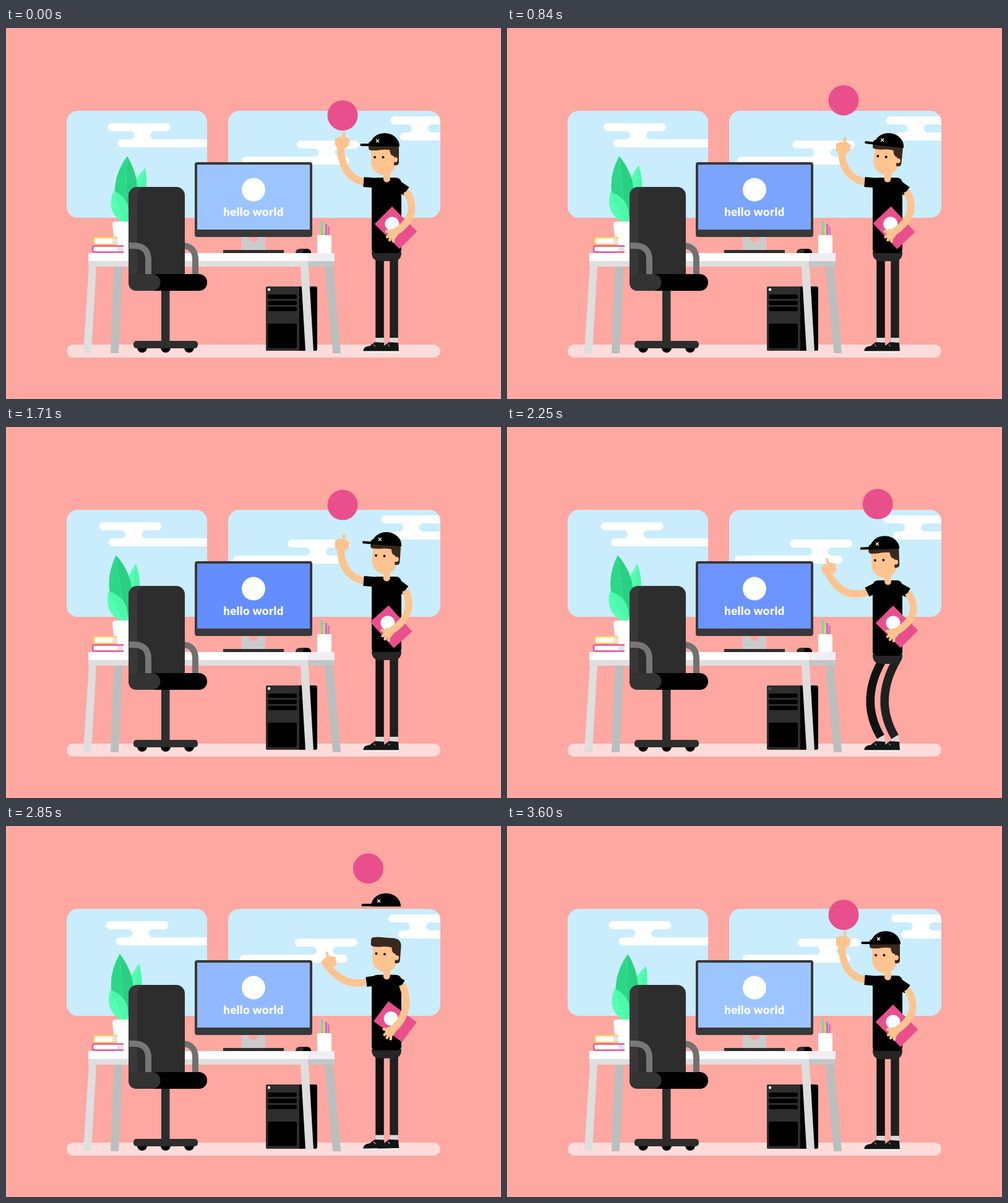
Write an HTML page that moves like this. It is 800x600 px and loops after 3.63 s.

```html
<!DOCTYPE html>
<html lang="en">
<head>
<meta charset="utf-8">
<title>Hello world</title>
<style>
html, body { margin: 0; width: 100%; height: 100%; overflow: hidden; background: #ffa7a1; }
svg { display: block; width: 800px; height: 600px; }
.skin { stroke: #ffc38f; fill: none; stroke-linecap: round; }
.sleeve { stroke: #000; stroke-width: 16; }
</style>
</head>
<body>
<svg viewBox="0 0 800 600">
  <defs>
    <clipPath id="panes">
      <rect x="98" y="134" width="227" height="173" rx="18"/>
      <rect x="359" y="134" width="343" height="173" rx="18"/>
    </clipPath>
    <g id="cloud" fill="#fff">
      <rect width="101" height="13" rx="6.5"/>
      <rect x="16" y="26" width="174" height="13" rx="6.5"/>
    </g>
    <path id="neck" d="M33 12.5V13a6.5 6.5 0 0 1 0 13v.5H72V26a6.5 6.5 0 0 1 0-13v-.5z" fill="#fff"/>
    <g id="shoe">
      <rect x="-6.500" y="-9" width="13" height="12" fill="#d9d9d9"/>
      <path d="M-27 14q0-8 11-9l8-6 15 1 1 14z" fill="#151515"/>
      <path d="M-28 14.5H8" stroke="#fff" stroke-width="2"/>
      <path d="M-10 3l3 3" stroke="#ddd"/>
    </g>
    <g id="slots"><rect x="423" width="47" height="7" rx="3"/></g>
  </defs>

  <g clip-path="url(#panes)">
    <path d="M90 130H710V310H90z" fill="#c9edfc"/>
    <g id="clouds">
      <use href="#cloud" x="164.500" y="154"/>
      <use href="#neck" x="168" y="154"/>
      <use href="#cloud" x="621" y="143"/>
      <use href="#neck" x="616.500" y="143"/>
      <g transform="translate(571 182) scale(-1 1)"><use href="#cloud"/><use href="#neck"/></g>
    </g>
  </g>
  <rect x="98" y="512" width="604" height="21" rx="10.500" fill="#ffdcda"/>

  <g id="plant"></g>
  <path d="M176 313H215V364H177L172 318q0-5 4-5z" fill="#fff"/>

  <!-- books -->
  <path d="M180 338.500H146q-4 0-4 4v4q0 4 4 4H180z" fill="#fff"/>
  <path d="M172 340h8v10h-8z" fill="#e3e3e3"/>
  <path d="M180 339H146q-4 0-4 4v3q0 4 4 4H180" fill="none" stroke="#ffcf56" stroke-width="2.500"/>
  <path d="M190 352H144q-4 0-4 4v2q0 4 4 4H190z" fill="#fff"/>
  <path d="M180 353h10v9h-10z" fill="#e3e3e3"/>
  <path d="M190 352.500H144q-4 0-4 4v2q0 4 4 4H190" fill="none" stroke="#e4569a" stroke-width="2.500"/>

  <!-- computer case -->
  <rect x="420" y="418" width="83" height="104" rx="3"/>
  <path d="M423 418H474V522H423q-3 0-3-3V421q0-3 3-3z" fill="#2e2e2e"/>
  <use href="#slots" y="431"/><use href="#slots" y="441"/><use href="#slots" y="451"/>
  <rect x="423" y="478" width="47" height="40" rx="3"/>
  <circle id="led" cx="425" cy="423" r="2.200"/>

  <!-- desk -->
  <g stroke-linejoin="round" stroke-width="2">
    <path d="M176 386h11l-6 139h-11zM516 386h11l13 139h-11z" fill="#b9bfbe" stroke="#b9bfbe"/>
    <path d="M135 386h10l-8 139h-11zM477 386h11l8 137h-11z" fill="#dedede" stroke="#dedede"/>
  </g>
  <path d="M133 364H488V377H133z" fill="#fff"/>
  <path d="M488 364H531V377H488z" fill="#f1eef3"/>
  <path d="M133 377H488V386H133z" fill="#dedede"/>
  <path d="M488 377H531V386H488z" fill="#c2c7c6"/>

  <!-- monitor -->
  <path d="M381 338H419V360H381z" fill="#cbcbcb"/>
  <path d="M392 338a8 8 0 0 0 16 0z" fill="#ffa7a1"/>
  <path d="M351 359H449V364H351z" fill="#2d2d2d"/>
  <rect x="305" y="217" width="190" height="121" rx="4" fill="#383838"/>
  <path id="screen" d="M309 221H491V326H309z"/>
  <circle cx="400" cy="261.500" r="19" fill="#fff"/>
  <text x="400" y="304" text-anchor="middle" font-family="Lato, sans-serif" font-weight="900" font-size="18.500" letter-spacing=".4" fill="#fff">hello world</text>
  <path d="M468 364q0-7 8-7h9q8 0 8 7z" fill="#2d2d2d"/>
  <path d="M480 364q0-6 4-7 9 0 9 7z"/>

  <!-- pencils -->
  <g stroke-width="3">
    <path d="M507 319V340" stroke="#f5a9c0"/>
    <path d="M510.500 312V340" stroke="#5fe0a0"/>
    <path d="M514 320V340" stroke="#ffc455"/>
    <path d="M517.500 317V340" stroke="#a274dc"/>
    <path d="M521.500 321V340" stroke="#e56fb0"/>
  </g>
  <rect x="503" y="335" width="23" height="29" rx="2" fill="#fff"/>

  <!-- chair -->
  <circle cx="220" cy="517" r="8"/><circle cx="258" cy="517" r="8"/><circle cx="296" cy="517" r="8"/>
  <path d="M251 420H264.500V510H251z" fill="#2d2d2d"/>
  <rect x="206" y="506" width="104" height="12" rx="5" fill="#2d2d2d"/>
  <path d="M284 352q22 0 22 23V400" fill="none" stroke="#707070" stroke-width="10"/>
  <rect x="198" y="257" width="60" height="168" rx="14" fill="#383838"/>
  <rect x="212" y="257" width="77" height="160" rx="14" fill="#2d2d2d"/>
  <rect x="220" y="398" width="105" height="27" rx="13" fill="#000"/>
  <path d="M198 398H236a13.500 13.500 0 0 1 0 27H212q-14 0-14-14z" fill="#333"/>
  <path d="M199 352H206q24 0 24 23V398" fill="none" stroke="#777" stroke-width="10"/>

  <!-- person -->
  <use id="shoeL" href="#shoe"/>
  <use id="shoeR" href="#shoe"/>
  <path id="legL" fill="none" stroke="#111" stroke-width="13.500"/>
  <path id="legR" fill="none" stroke="#202020" stroke-width="13.500"/>
  <path id="armL" class="skin" stroke-width="11.500"/>
  <path id="sleeveL" class="sleeve"/>
  <g id="handL" class="skin" stroke-width="4.500">
    <rect x="-9" y="-6" width="18" height="14" rx="5" fill="#ffc38f"/>
    <path d="M-9-5V0M-4-7V0M2-4 3.500-15M6 3l5-5"/>
  </g>
  <g id="torso">
    <path d="M591 362H639V363q0 14-14 14H605q-14 0-14-14z" fill="#262626"/>
    <path d="M600 242H630q9 0 9 11V358q0 6-9 6H600q-9 0-9-6V253q0-11 9-11z"/>
  </g>
  <path id="sleeveR" class="sleeve"/>
  <g id="card">
    <rect x="-28.500" y="-20" width="57" height="40" fill="#e94f8c"/>
    <circle cx="-8.500" r="11.500" fill="#fff"/>
  </g>
  <path id="armR" class="skin" stroke-width="11.500" style="stroke-linecap:butt"/>
  <g id="handR" class="skin" stroke-width="4.500">
    <circle r="6" fill="#ffc38f"/>
    <path d="M-2-3-10-4M-2 0-9 5M-1 2-5 10M2 2 1 12"/>
  </g>
  <g id="head">
    <path d="M615.500 230V244" class="skin" stroke-width="11"/>
    <path d="M590 188H631V217a20.500 20.500 0 0 1-41 0z" fill="#ffc38f"/>
    <path d="M586 187q0-4 5-4 4-1 8-1H623q12 1 12 13V217q0 5-5 5h-3V207q-6 0-7-10-12-1-20 1H591q-5 0-5-4z" fill="#3a281d"/>
    <circle cx="629" cy="213" r="4" fill="#ffc38f"/>
    <circle cx="596" cy="209" r="2"/><circle cx="609.500" cy="209" r="2"/>
  </g>
  <g id="hat">
    <path d="M588 191.500V191a24 21 0 0 1 48 0v.5z"/>
    <path d="M574.500 189H595" stroke="#000" stroke-width="4" stroke-linecap="round"/>
    <path d="M598 180l5 5m0-5-5 5" stroke="#fff" stroke-width="1.300"/>
  </g>
  <circle id="ball" r="24.500" fill="#e94f8c"/>
</svg>

<script>
const LOOP = 3630, HALF = LOOP / 2, GRAVITY = 0.00035;
const el = id => document.getElementById(id);
const set = (id, name, value) => el(id).setAttribute(name, value);
const place = (id, x, y, angle = 0) => set(id, 'transform', `translate(${x} ${y}) rotate(${angle})`);
const arc = (t, apexTime, apexY) => apexY + GRAVITY * (t - apexTime) ** 2;

// Smooth curve through keys that never overshoots them
function track(times, values, t) {
  const last = times.length - 1;
  if (t <= times[0]) return values[0];
  if (t >= times[last]) return values[last];
  const i = times.findIndex(k => k > t) - 1;
  const slope = k => k < 0 || k >= last ? 0 : (values[k + 1] - values[k]) / (times[k + 1] - times[k]);
  const tangent = k => {
    const a = slope(k - 1), b = slope(k);
    return a * b <= 0 ? 0 : 2 * a * b / (a + b);
  };
  const d = times[i + 1] - times[i], p = (t - times[i]) / d, q = 1 - p;
  return values[i] * q * q * (1 + 2 * p) + values[i + 1] * p * p * (3 - 2 * p)
    + d * p * q * (tangent(i) * q - tangent(i + 1) * p);
}

// cubic-bezier(.5, 0, .3, 1)
function ease(x) {
  let lo = 0, hi = 1, s;
  for (let i = 0; i < 20; i++) {
    s = (lo + hi) / 2;
    const bx = 1.5 * (1 - s) ** 2 * s + 0.9 * (1 - s) * s * s + s ** 3;
    if (bx < x) lo = s; else hi = s;
  }
  return s * s * (3 - 2 * s);
}

const bodyTimes = [2050, 2250, 2330, 2404, 2470, 2610, 2860, 2970, 3090, 3330];
const bodyY = [0, 6, 10, 3.5, -22, -35, 0, 15, 12, 0];

const poseTimes = [1810, 2250, 2610, 3090, 3335];
const pose = {
  cuffX: [578, 582, 588, 577, 578], cuffY: [249, 267, 240, 264, 249],
  elbowX: [541, 541, 550, 541, 541], elbowY: [240, 280, 264, 257, 240],
  handX: [543, 520, 518, 530, 543], handY: [184, 229, 230, 203, 184], handTurn: [0, -25, -45, -5, 0],
  tilt: [0, -2, 11, -2, 0],
  cuff2X: [647, 648, 632, 649, 647], cuff2Y: [264, 268, 240, 273, 264],
  elbow2X: [672, 674, 636, 682, 672], elbow2Y: [305, 306, 300, 306, 305],
  grip: [625, 624, 618, 624, 625], gripY: [333, 334, 330, 335, 333],
  cardX: [630, 630, 629, 629, 630], cardY: [323, 323, 308, 325, 323], cardTurn: [45, 45, 28, 45, 45]
};

function ballY(t) {
  if (t < 1810) {
    const p = t % 632;
    return p < 546 ? arc(p, 273, 115.5) : 141.5 + 4 * Math.sin(Math.PI * (p - 546) / 86);
  }
  if (t < 2404) return arc(t, 2090, 115.5);
  if (t < 2470) return track([2404, 2470], [150, 126], t);
  if (t < 3330) return arc(t, 2876, 68.5);
  return 141 + 9 * Math.sin(Math.PI * (t - 3330) / 300);
}

function buildPlant() {
  const leaf = (x, y, length, bend, angle, light, dark) => {
    const half = (side, fill) => `<path d="M0 0Q${side * bend} ${-length * 0.5} 0 ${-length}z" fill="${fill}"/>`;
    return `<g transform="translate(${x} ${y}) rotate(${angle})">${half(-1, light)}${half(1, dark)}</g>`;
  };
  el('plant').innerHTML = leaf(198, 316, 94, 24, 16.7, '#53ffb0', '#4cf8a9')
    + leaf(192, 316, 109, 36, 2, '#2bd888', '#29d083')
    + leaf(194, 318, 59, 27, -19.6, '#53ffb0', '#4cf8a9');
}

function drawRoom(t) {
  const k = t < HALF ? ease(t / HALF) : 1 - ease(t / HALF - 1);
  place('clouds', -14.5 * k, 0);
  set('screen', 'fill', `rgb(${156 - 56 * k},${197 - 56 * k},255)`);
  const sway = t < HALF ? 1 - (1 - t / HALF) ** 2.7 : 1 - (t / HALF - 1) ** 2;
  set('plant', 'transform', `rotate(${-9.5 * sway} 188 315)`);
  const blink = t / LOOP * 4 % 1;
  set('led', 'fill', blink > 0.45 && blink < 0.75 ? '#555' : '#fff');
}

function drawPerson(t) {
  const y = ballY(t), dy = track(bodyTimes, bodyY, t), m = {};
  for (const key in pose) m[key] = track(poseTimes, pose[key], t);

  place('ball', track([1810, 2230, 2470, 2600, 3090, 3220], [544, 598.5, 603, 603.5, 557, 544], t), y);

  const lift = t < 1810 || t > 3330 ? 141 - y : 0;
  const handY = m.handY + (lift > 0 ? lift * 0.37 : -lift);
  const tilt = m.tilt + Math.max(0, lift) * 0.25;
  set('armL', 'd', `M${m.cuffX + 4} ${m.cuffY}L${m.cuffX} ${m.cuffY}Q${m.elbowX} ${m.elbowY} ${m.handX - 2} ${handY + 6}`);
  set('sleeveL', 'd', `M602 ${251 + dy}L${m.cuffX} ${m.cuffY}`);
  place('handL', m.handX, handY, m.handTurn);

  const sway = track([0, 840, 1710, 2250], [0, -4.5, -7.5, 0], t);
  const gripX = m.grip + sway;
  set('sleeveR', 'd', `M628 ${251 + dy}L${m.cuff2X + sway * 0.2} ${m.cuff2Y}`);
  set('armR', 'd', `M${m.cuff2X + sway * 0.2} ${m.cuff2Y}Q${m.elbow2X + sway} ${m.elbow2Y} ${gripX} ${m.gripY}`);
  place('handR', gripX, m.gripY);
  place('card', m.cardX + sway, m.cardY, m.cardTurn - sway * 0.4);

  place('torso', 0, dy);
  const onHead = `translate(0 ${dy}) rotate(${tilt} 615 240)`;
  const hatY = arc(t, 2806, -62);
  set('head', 'transform', onHead);
  set('hat', 'transform', t > 2470 && hatY < dy ? `translate(2 ${hatY})` : onHead);

  const rise = Math.min(0, dy), knee = 13 * Math.sqrt(Math.max(0, dy));
  for (const [side, x] of [['L', 604], ['R', 627]]) {
    set('leg' + side, 'd', `M${x + knee * 0.1} ${370 + dy}Q${x - knee * 1.1} ${442 + rise} ${x} ${501 + rise}`);
    place('shoe' + side, x, 509 + rise, rise);
  }
}

function frame(now) {
  const t = now % LOOP;
  drawRoom(t);
  drawPerson(t);
  requestAnimationFrame(frame);
}

buildPlant();
frame(0);
</script>
</body>
</html>
```
